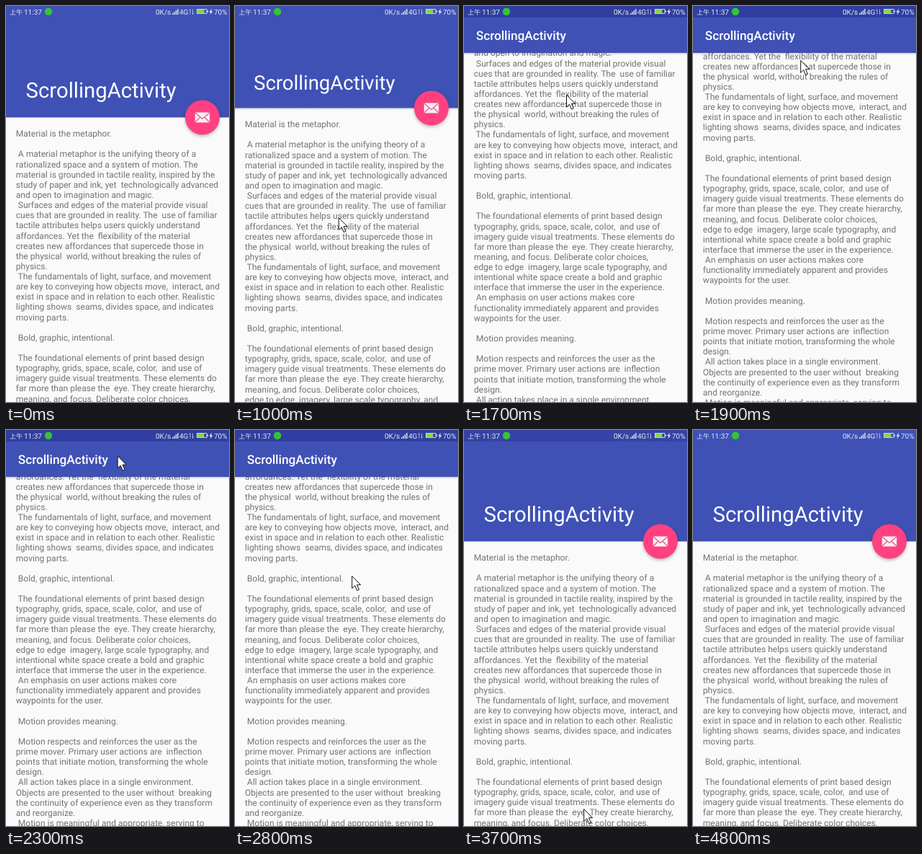
Recreate the animation shown at these times as an HTML page. Size 310 by 549 pixels, loop 5500 ms.

```html
<!DOCTYPE html>
<html lang="en">
<head>
<meta charset="utf-8">
<title>Scrolling activity</title>
<style>
html, body { margin: 0; width: 100%; height: 100%; overflow: hidden; background: #fafafa; }
svg { display: block; width: 310px; height: 549px; }
text { font-family: Roboto, "Noto Sans CJK SC", "Noto Sans CJK", sans-serif; white-space: pre; text-rendering: geometricPrecision; }
#body { font-size: 12.056px; fill: #737373; }
#status { font-size: 10px; fill: #e4e7f5; }
#title { fill: #fff; }
#fab { filter: drop-shadow(0 2px 2px rgba(0, 0, 0, .28)); }
</style>
</head>
<body>
<svg viewBox="0 0 310 549">
  <defs>
    <linearGradient id="fade" x2="0" y2="1">
      <stop stop-opacity=".16"/><stop offset="1" stop-opacity="0"/>
    </linearGradient>
  </defs>
  <rect width="310" height="549" fill="#fafafa"/>
  <g id="body"></g>
  <rect id="shadow" width="310" height="3" fill="url(#fade)"/>
  <rect id="header" width="310" fill="#3f51b5"/>
  <text id="title">ScrollingActivity</text>
  <rect id="scrim" width="310" height="16" fill="#303f9f"/>
  <g id="status">
    <text x="5" y="11.5" font-size="9">上午</text>
    <text x="25" y="11.5">11:37</text>
    <circle cx="59" cy="7.7" r="5.2" fill="#35c435"/>
    <text x="208" y="11.5">0K/s</text>
    <path d="M231 10h1.4v2h-1.4zm2.4-2h1.4v4h-1.4zm2.4-2h1.4v6h-1.4zm2.4-2h1.4v8h-1.4z"/>
    <text x="241" y="11.5">4G</text>
    <path d="M256 11.5V4.5l-1.5 2M259.5 4.5v7l1.5-2" fill="none" stroke="#b9c0e4" stroke-width=".9"/>
    <rect x="265.5" y="4.5" width="13.5" height="6" fill="none" stroke="#c5cbe9"/>
    <rect x="266" y="5" width="9.5" height="5" fill="#8bd34c"/>
    <path d="M279.5 6h1.3v3h-1.3zM286 3.5l-3.6 5h2.2l-1 4 3.9-5.3h-2.3z"/>
    <text x="289" y="11.5">70%</text>
  </g>
  <g id="fab">
    <circle r="24" fill="#ff4081"/>
    <rect x="-10.2" y="-7" width="20.4" height="14" rx="1" fill="#f5f0f2"/>
    <path d="M-10-6.5 0 2 10-6.5M-10 6.5-3-.3M10 6.5 3-.3" fill="none" stroke="#e8568b" stroke-width="1.2"/>
  </g>
  <path id="cursor" d="M.7 1.5v17l4-3.8 3 6.8 2.8-1.2-3-6.6h5.2z" fill="#fff" stroke="#111"/>
</svg>
<script>
const LOOP = 5500, STEP = 100, LINE = 14.13;
const TALL = 154.5, SHORT = 65;

const lines = `Material is the metaphor.

 A material metaphor is the unifying theory of a
rationalized space and a system of motion. The
material is grounded in tactile reality, inspired by the
study of paper and ink, yet  technologically advanced
and open to imagination and magic.
 Surfaces and edges of the material provide visual
cues that are grounded in reality. The  use of familiar
tactile attributes helps users quickly understand
affordances. Yet the  flexibility of the material
creates new affordances that supercede those in
the physical  world, without breaking the rules of
physics.
 The fundamentals of light, surface, and movement
are key to conveying how objects move,  interact, and
exist in space and in relation to each other. Realistic
lighting shows  seams, divides space, and indicates
moving parts.

 Bold, graphic, intentional.

 The foundational elements of print based design
typography, grids, space, scale, color,  and use of
imagery guide visual treatments. These elements do
far more than please the  eye. They create hierarchy,
meaning, and focus. Deliberate color choices,
edge to edge  imagery, large scale typography, and
intentional white space create a bold and graphic
interface that immerse the user in the experience.
 An emphasis on user actions makes core
functionality immediately apparent and provides
waypoints for the user.

 Motion provides meaning.

 Motion respects and reinforces the user as the
prime mover. Primary user actions are  inflection
points that initiate motion, transforming the whole
design.
 All action takes place in a single environment.
Objects are presented to the user without  breaking
the continuity of experience even as they transform
and reorganize.
 Motion is meaningful and appropriate, serving to`.split("\n");

// Keys: [time, value, ...]
const scrollKeys = [[950, 0], [1200, 65], [1400, 118], [1900, 249], [2000, 254],
  [2800, 254], [2900, 248], [3200, 155], [3700, 0]];
const cursorKeys = [[100, 245, 133], [600, 156, 391], [1400, 131, 193], [1900, 149, 74],
  [2200, 153, 3], [2400, 156, 66], [2800, 162, 201], [3200, 164, 372], [3700, 166, 524],
  [4200, 179, 520], [4700, 298, 100]];
const scrimKeys = [[1200, 0], [1600, 1], [3600, 1], [4000, 0]];
const fabKeys = [[1200, 1], [1400, .18], [1500, 0], [3450, 0], [3700, 1]];

const el = id => document.getElementById(id);
const set = (id, attrs) => {
  for (const name in attrs) el(id).setAttribute(name, attrs[name]);
};
const mix = (a, b, p) => a + (b - a) * p;

function at(keys, t, col = 1) {
  const i = keys.findIndex(k => k[0] > t);
  if (i === 0) return keys[0][col];
  if (i < 0) return keys[keys.length - 1][col];
  const a = keys[i - 1], b = keys[i];
  return mix(a[col], b[col], (t - a[0]) / (b[0] - a[0]));
}

lines.forEach((line, i) => {
  const text = document.createElementNS("http://www.w3.org/2000/svg", "text");
  text.textContent = line;
  text.setAttribute("x", 13.8);
  text.setAttribute("y", 181.2 + i * LINE);
  el("body").append(text);
});

function draw(t) {
  const scroll = at(scrollKeys, t);
  const bottom = Math.max(SHORT, TALL - scroll);
  const p = (TALL - bottom) / (TALL - SHORT);
  const fab = at(fabKeys, t);

  set("body", { transform: `translate(0 ${-scroll})` });
  set("header", { height: bottom });
  set("shadow", { y: bottom, opacity: scroll > 0 ? 1 : 0 });
  set("title", {
    x: mix(27.6, 16.8, p),
    y: mix(127.4, 46.8, p),
    "font-size": mix(29.3, 17.2, p),
    "font-weight": p < 1 ? 400 : 500
  });
  set("scrim", { opacity: at(scrimKeys, t) });
  set("fab", { transform: `translate(273 ${bottom}) scale(${fab})`, opacity: fab * fab });
  set("cursor", {
    transform: `translate(${at(cursorKeys, t)} ${at(cursorKeys, t, 2)})`,
    opacity: t >= 100 && t < 4800 ? 1 : 0
  });
}

const start = performance.now();
function tick() {
  const t = (performance.now() - start) % LOOP;
  draw(Math.floor(t / STEP) * STEP);
  requestAnimationFrame(tick);
}
tick();
</script>
</body>
</html>
```
